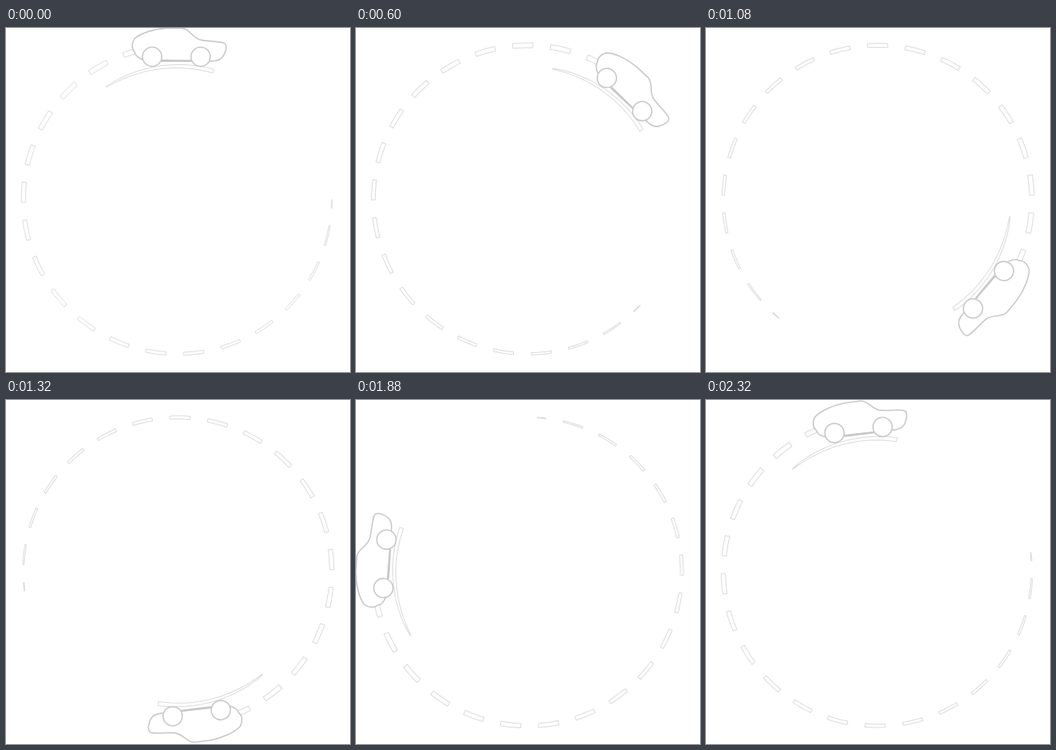
An HTML page for the animation above (2.36 s loop, 436 by 436 pixels).

```html
<!DOCTYPE html>
<html lang="en">
<head>
<meta charset="utf-8">
<title>Car on a dashed circle</title>
<style>
  html, body { margin: 0; width: 100%; height: 100%; overflow: hidden; background: #fff; }
  svg { display: block; width: 100%; height: 100%; }
  path, circle { fill: #fff; stroke-linejoin: round; }
  #track { stroke: #dadada; stroke-width: 1; }
  #car { stroke: #c8c8c8; stroke-width: 1.6; }
</style>
</head>
<body>
<svg viewBox="0 0 436 436">
  <g id="ring">
    <path id="track"/>
    <g id="car" transform="translate(0 -.6)">
      <path d="M174 41C167 38 163 35 163 31C159 27 159 20 163 14C171 7 187 2 203 .8H223C234 2 236 14 248 16C259 18 270 17 277 20C281 23 279 29 276 35C273 41 268 43 259 42.5Z"/>
      <path d="M197 42.5H235" stroke-width="2.2"/>
      <circle cx="185.2" cy="37" r="12.2"/>
      <circle cx="246.7" cy="37" r="12.2"/>
    </g>
  </g>
</svg>
<script>
const CX = 217.5, CY = 217.5, HOLD = 400, STEP = 40, STEPS = 50, LOOP = 2360;
const ring = document.getElementById('ring');

// Angles are degrees clockwise from the top.
function point(angle, radius) {
  const a = angle * Math.PI / 180;
  return `${(CX + radius * Math.sin(a)).toFixed(2)} ${(CY - radius * Math.cos(a)).toFixed(2)}`;
}

// Width that grows from a fine tip to the full size.
const taper = (from, to, size) => angle => 0.5 + (size - 0.5) * Math.sqrt((angle - from) / (to - from));

// Curved bar from angle a to b.
function bar(a, b, radius, width) {
  const outer = [], inner = [], n = 16;
  for (let i = 0; i <= n; i++) {
    const angle = a + (b - a) * i / n, half = width(angle) / 2;
    outer.push(point(angle, radius + half));
    inner.unshift(point(angle, radius - half));
  }
  return `M${[...outer, ...inner].join('L')}Z`;
}

let track = bar(-32.4, 15.5, 169, taper(-32.4, 15.5, 5));
const dashWidth = taper(-270, -17, 6.3);
for (let k = 0; k < 19; k++) {
  const mid = -16.8 - 14.1 * k;
  track += bar(Math.max(mid - 3.75, -270), mid + 3.75, 195.5, dashWidth);
}
document.getElementById('track').setAttribute('d', track);

const start = performance.now();
function draw() {
  const t = (performance.now() - start) % LOOP;
  const step = t < HOLD ? 0 : Math.floor((t - HOLD) / STEP) + 1;
  ring.setAttribute('transform', `rotate(${step * 360 / STEPS} ${CX} ${CY})`);
  requestAnimationFrame(draw);
}
draw();
</script>
</body>
</html>
```
